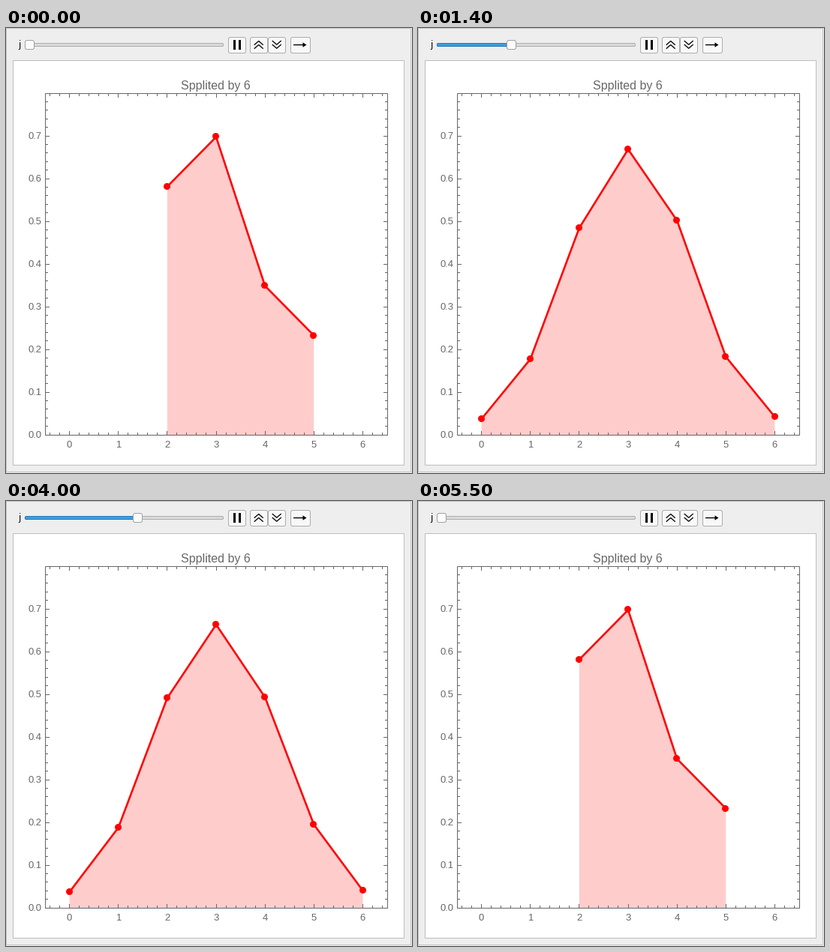
A matplotlib script that plays this animation: 541x594 px, repeating every 6 s.

```python
import numpy as np
import matplotlib.pyplot as plt
from matplotlib.animation import FuncAnimation
from matplotlib.patches import Circle, FancyBboxPatch, Polygon, Rectangle

W, H, DPI = 541, 594, 128
PT = 72 / DPI                      # points per pixel
LEFT, RIGHT, TOP, BOTTOM = 52, 508, 87, 543
UNIT_X, UNIT_Y = (RIGHT - LEFT) / 7, (BOTTOM - TOP) / 0.8
GREY, RED, PINK = "#666666", "#ff0000", "#ffcccc"

# Coordinates already sit on pixel centres, so keep the renderer from moving them
plt.rcParams["path.snap"] = False

fig = plt.figure(figsize=(W / DPI, H / DPI), dpi=DPI, facecolor="#eeeeee")
ax = fig.add_axes([0, 0, 1, 1])
ax.set(xlim=(0, W), ylim=(H, 0))
ax.axis("off")


def to_x(v):
    return LEFT + (v + 0.5) * UNIT_X


def to_y(v):
    return BOTTOM - v * UNIT_Y


def pixel(v):
    """Centre of the pixel that holds v."""
    return np.floor(v + 1e-6) + 0.5


def stroke(xs, ys, color, width, z=2, **kw):
    return ax.plot(xs, ys, color=color, lw=width * PT, zorder=z, **kw)[0]


def box(x, y, w, h, face, edge, z=1):
    ax.add_patch(Rectangle((x, y), w, h, fc=face, ec=edge, lw=PT, zorder=z))


def round_box(x, y, w, h, r, face, edge, z=2):
    patch = FancyBboxPatch((x, y), w, h, boxstyle=f"round,pad=0,rounding_size={r}",
                           fc=face, ec=edge, lw=PT, zorder=z)
    return ax.add_patch(patch)


def label(x, y, s, size, color=GREY, ha="center", font="Liberation Sans"):
    ax.text(x, y, s, fontsize=size * PT, color=color, ha=ha, va="baseline",
            family=font, zorder=8)


def draw_controls():
    label(18, 26, "j", 12, "black", font="DejaVu Sans")
    round_box(25.5, 20.5, 264, 4, 1.5, "#dadada", "#adadad")
    for x, w in ((296.5, 23), (325.5, 23), (349.5, 23), (379.5, 26)):
        round_box(x, 12.5, w, 21, 2.5, "#f8f8f8", "#acacac")
    for x in (303, 310):
        ax.add_patch(Rectangle((x, 16), 3, 13, fc="black", lw=0, zorder=4))
    for x, way in ((336.7, 1), (360.7, -1)):
        for mid in (19.8, 24.8):
            stroke([x - 5.5, x, x + 5.5],
                   [mid + 2.4 * way, mid - 2.4 * way, mid + 2.4 * way],
                   "black", 1.3, 4, solid_joinstyle="miter")
    stroke([383, 397], [22.5, 22.5], "black", 1.4, 4, solid_capstyle="butt")
    ax.add_patch(Polygon([(395.5, 19.3), (400.5, 22.5), (395.5, 25.7)],
                         fc="black", lw=0, zorder=4))


def tick(x, y, dx, dy):
    stroke([x, x + dx], [y, y + dy], GREY, 1, 4, solid_capstyle="butt")


def draw_axes():
    label(279.3, 82, "Spplited by 6", 16)
    left, right, top, bottom = (pixel(v) for v in (LEFT, RIGHT, TOP, BOTTOM))
    ax.add_patch(Rectangle((left, top), right - left, bottom - top,
                           fill=False, ec=GREY, lw=PT, zorder=4))
    for i in range(-2, 33):
        x, size = to_x(i / 5), 3.5 if i % 5 else 5.5
        tick(pixel(x), bottom, 0, -size)
        tick(pixel(x), top, 0, size)
        if i % 5 == 0:
            label(x, 560, str(i // 5), 13)
    for i in range(40):
        y, size = to_y(i / 50), 3.5 if i % 5 else 5.5
        tick(left, pixel(y), size, 0)
        tick(right, pixel(y), -size, 0)
        if i % 5 == 0:
            label(47.6, y + 4.4, f"{i / 50:.1f}", 13, ha="right")


box(0.5, 0.5, 539, 592, "#eeeeee", "#c4c4c4")
box(9.5, 43.5, 521, 540, "white", "#bdbdbd")
draw_controls()
draw_axes()

# Distribution at every fifth step, as pixel heights of the seven markers
KNOTS = np.array([0, 5, 10, 15, 20, 25])
HEIGHTS = np.array([
    [522, 447, 267, 160, 252, 443, 517],
    [521, 441, 266, 161, 256, 438, 518],
    [521, 435, 262, 164, 261, 431, 519],
    [521, 434, 265, 162, 261, 431, 521],
    [522, 434, 266, 162, 262, 431, 521],
])
first = np.array([0, 0, 5, 6, 3, 2, 0])
SHAPES = np.vstack([first / np.linalg.norm(first), (542.05 - HEIGHTS) / UNIT_Y])


def knob_x(step):
    return np.interp(step, [0, 1, 5, 10, 15, 20, 25],
                     [31.5, 32.2, 71.5, 124.5, 175.5, 225.5, 276.5])


def samples(step):
    return 16 if step == 0 else 38 + 12.6 * (knob_x(step) - knob_x(1))


def distribution(step):
    """Bin positions and heights; bins without a sample are left out."""
    if step >= 5:
        values = [np.interp(step, KNOTS, column) for column in SHAPES.T]
        return np.arange(7), np.array(values)
    n0, n1, n = samples(0), samples(5), samples(step)
    share = [s / s.sum() for s in SHAPES[:2]]
    w = (n - n0) / (n1 - n0)
    counts = (1 - w) * n0 * share[0] + w * n1 * share[1]
    bins = np.flatnonzero(counts > 0.5)
    return bins, counts[bins] / np.linalg.norm(counts[bins])


area = ax.add_patch(Polygon([(0, 0), (0, 1), (1, 1)], fc=PINK, lw=0, zorder=3))
curve = stroke([], [], RED, 2.6, 5, solid_joinstyle="round", solid_capstyle="butt")
dots = [ax.add_patch(Circle((0, 0), 4.5, fc=RED, lw=0, zorder=6)) for _ in range(7)]
filled = round_box(25.5, 20.5, 6, 4, 1.5, "#3c9fe1", "#2b78ad", 3)
knob = round_box(25.5, 16.5, 12, 12, 2.5, "#fbfbfb", "#a0a0a0", 5)


def update(frame):
    step = int(np.clip(frame - 4, 0, 25)) if frame < 30 else max(55 - frame, 0)
    bins, values = distribution(step)
    xs, ys = to_x(bins), to_y(values)
    curve.set_data(xs, ys)
    area.set_xy(np.column_stack([np.r_[xs[0], xs, xs[-1]],
                                 np.r_[BOTTOM, ys, BOTTOM]]))
    for i, dot in enumerate(dots):
        dot.set_visible(i in bins)
    for i, x, y in zip(bins, xs, ys):
        dots[i].center = pixel(x - 0.4), pixel(y - 0.45)
    pos = pixel(knob_x(step))
    knob.set_x(pos - 6)
    filled.set_width(pos - 25.5)
    return [area, curve, filled, knob, *dots]


anim = FuncAnimation(fig, update, frames=60, interval=100, repeat=True,
                     repeat_delay=0, blit=False)
plt.show()
```
